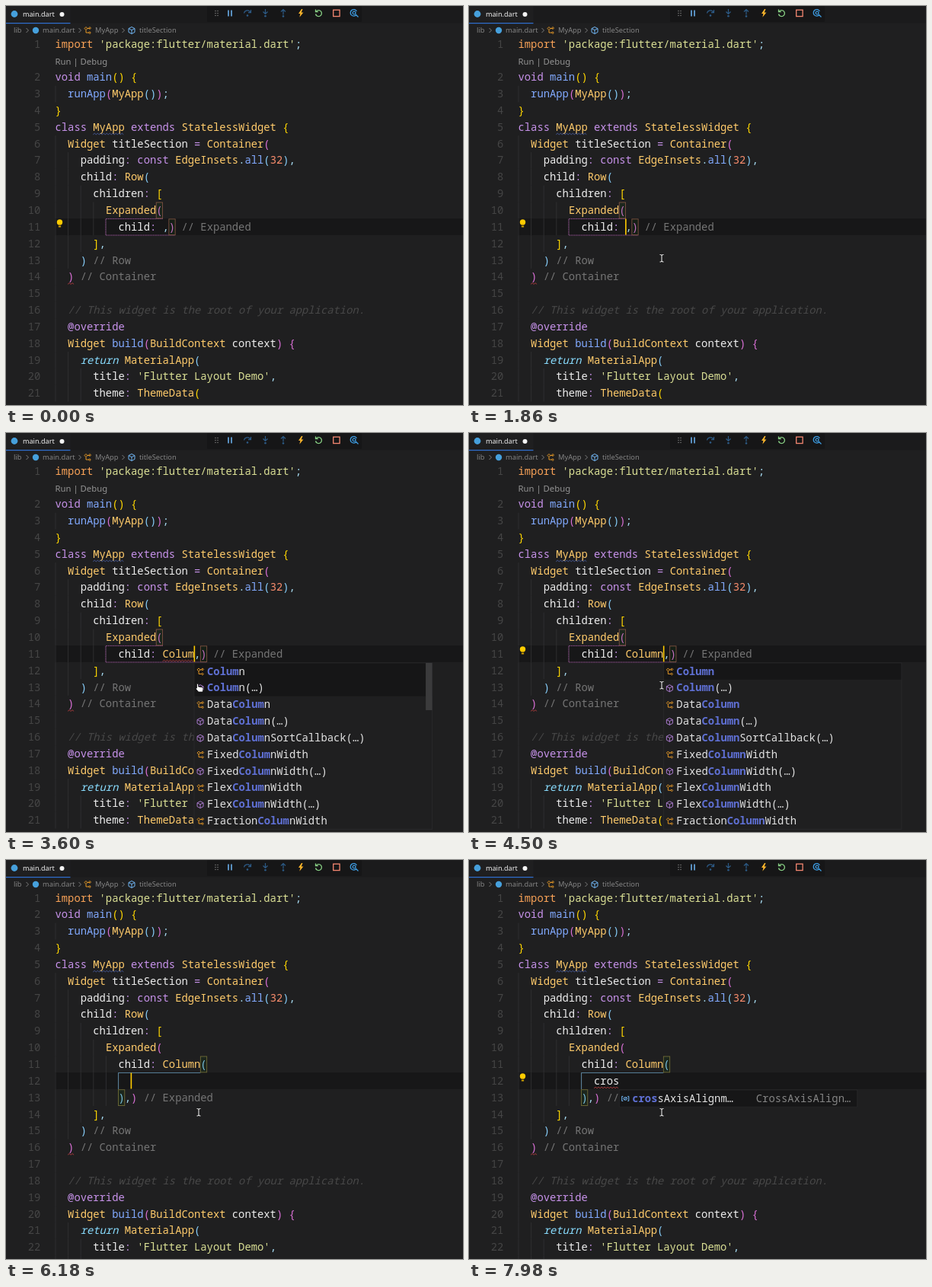
Animation, 600 px wide and 524 px high, one loop 8000 ms. Source, as an HTML page:

```html
<!DOCTYPE html>
<html lang="en">
<head>
<meta charset="utf-8">
<title>Editor autocomplete</title>
<style>
  html, body { margin: 0; width: 100%; height: 100%; overflow: hidden; background: #1f1f20; }
  svg { display: block; }
  text { white-space: pre; }
  .code { font: 13.83px "Noto Sans Mono", "DejaVu Sans Mono", monospace; font-variant-ligatures: none; }
  .ui { font-family: "Noto Sans", "Open Sans", sans-serif; }
</style>
</head>
<body>
<svg id="stage" width="600" height="524" viewBox="0 0 600 524">
  <rect width="600" height="524" fill="#1f1f20"/>
  <g id="editor" class="code"></g>
  <g id="chrome" class="ui"></g>
  <g id="popup" class="code"></g>
  <rect id="caret" width="1.6" height="21" y="279.5" fill="#ffcc00"/>
  <g id="mouse"></g>
</svg>
<script>
const LOOP = 8000, X0 = 64.5, CW = 8.298, Y0 = 50, LH = 21.84;
const LAG = 140, NEWLINE = 6120, POP_TOP = 302;
const EDIT_ROW = 11;
const BRACKETS = ['#ffd700', '#da70d6', '#87cefa'];
const C = {
  white: '#eeeeee', type: '#ffcb6b', key: '#c792ea', fn: '#82aaff', str: '#dbe095',
  num: '#f78c6c', punct: '#a5daf0', label: '#757575', note: '#484848', dim: '#858585',
  match: '#5f70d4', field: '#75beff', cube: '#b180d7', cls: '#ee9d28', mark: '#46a0dc',
  error: '#d04545', info: '#4f68b8'
};

// Time of each key press and the text it leaves after "child: "
const keys = [
  [-500, ''], [2820, 'C'], [3000, 'Co'], [3140, 'Col'], [3340, 'Colu'], [3450, 'Colum'],
  [4050, 'Column'], [4630, 'Column()'], [NEWLINE, '\n'],
  [7140, '\nc'], [7260, '\ncr'], [7380, '\ncro'], [7475, '\ncros']
];

const columns = ['Column', 'Column(…)', 'DataColumn', 'DataColumn(…)', 'DataColumnSortCallback(…)',
  'FixedColumnWidth', 'FixedColumnWidth(…)', 'FlexColumnWidth', 'FlexColumnWidth(…)', 'FractionColumnWidth'];
const params = ['children: <Widget>…', 'crossAxisAlignment:', 'key:', 'mainAxisAlignment:',
  'mainAxisSize:', 'textBaseline:', 'textDirection:', 'verticalDirection:'];

const $ = id => document.getElementById(id);
const colX = c => X0 + c * CW;
const rowY = r => Y0 + r * LH;
const isBroken = word => word[0] === '\n';
const esc = s => s.replace(/&/g, '&amp;').replace(/</g, '&lt;');
const text = (x, y, s, fill, extra = '') => `<text x="${x.toFixed(2)}" y="${y.toFixed(2)}" fill="${fill}" ${extra}>${esc(s)}</text>`;
const rect = (x, y, w, h, fill, extra = '') => `<rect x="${x}" y="${y}" width="${w}" height="${h}" fill="${fill}" ${extra}/>`;
const path = (d, stroke, w = 1, extra = '') => `<path d="${d}" fill="none" stroke="${stroke}" stroke-width="${w}" ${extra}/>`;
const at = (x, y, s) => `<g transform="translate(${x} ${y})">${s}</g>`;
const dot = (x, y, r, fill) => `<circle cx="${x}" cy="${y}" r="${r}" fill="${fill}"/>`;

const cube = color => path('M0 -4.5L4 -2.4V2.4L0 4.5L-4 2.4V-2.4ZM-4 -2.4L0 -.4L4 -2.4M0 -.4V4.5', color, 0.95);
const icons = {
  cls: path('M-4 -2.5l2 -2 2 2 -2 2zM-.5 -2.5H2.5M-2 -.5V3H2M2 -3.5l1 -1 1.5 1.5 -1.5 1.5zM1.5 3l1.3 -1.3 1.5 1.5 -1.4 1.3z', C.cls, 0.95),
  cube: cube(C.cube),
  field: path('M-3 -3H-4.5V3H-3M3 -3H4.5V3H3M-2.3 0a2.3 1.8 0 1 0 4.6 0a2.3 1.8 0 1 0 -4.6 0M-1.5 1.6L1.8 -1.8', C.field, 1)
};

function source(word) {
  const edit = isBroken(word)
    ? ['          child: Column(', ' '.repeat(12) + word.slice(1), '          ),) // Expanded']
    : [`          child: ${word},) // Expanded`];
  return [
    "import 'package:flutter/material.dart';",
    ...(isBroken(word) ? [] : [null]), // null is the "Run | Debug" row
    'void main() {', '  runApp(MyApp());', '}',
    'class MyApp extends StatelessWidget {',
    '  Widget titleSection = Container(',
    '    padding: const EdgeInsets.all(32),',
    '    child: Row(', '      children: [', '        Expanded(',
    ...edit,
    '      ],', '    ) // Row', '  ) // Container', '',
    '  // This widget is the root of your application.',
    '  @override', '  Widget build(BuildContext context) {',
    '    return MaterialApp(', "      title: 'Flutter Layout Demo',", '      theme: ThemeData('
  ];
}

function tokenColor(tok) {
  if (tok === 'import') return '#f9a257';
  if (tok === 'return') return '#89ddff';
  if (/^(void|class|extends|const|@override|[:=])$/.test(tok)) return C.key;
  if (/^(main|runApp|build|all)$/.test(tok)) return C.fn;
  if (/^[A-Z]/.test(tok)) return C.type;
  if (tok[0] === "'") return C.str;
  if (/^\d/.test(tok)) return C.num;
  return /^\w/.test(tok) ? C.white : C.punct;
}

function codeLine(line, y, state) {
  let out = '';
  for (const m of line.matchAll(/\/\/.*|'[^']*'|@?\w+|[^\s\w]/g)) {
    const tok = m[0];
    const note = tok.startsWith('//') && !line.slice(0, m.index).trim();
    let fill;
    if (tok.startsWith('//')) fill = note ? C.note : C.label;
    else if ('([{'.includes(tok)) fill = BRACKETS[state.depth++ % 3];
    else if (')]}'.includes(tok)) fill = BRACKETS[--state.depth % 3];
    else fill = tokenColor(tok);
    out += text(colX(m.index), y, tok, fill, note || tok === 'return' ? 'font-style="italic"' : '');
  }
  return out;
}

function squiggle(col, row, n, stroke) {
  let d = `M${colX(col)} ${rowY(row) + 9.6}`;
  for (let i = 0; i < n * CW / 2 - 1; i++) d += `l2 ${i % 2 ? 1.6 : -1.6}`;
  return path(d, stroke, 0.75);
}

const bracketBox = (col, row, stroke) =>
  rect(colX(col), rowY(row) - 10.4, CW, 20.8, 'rgba(0,100,0,.1)', `stroke="${stroke}" stroke-width=".9"`);

function pairGuide(word) {
  const top = 279.5, bottom = 301, olive = '#6f6a35', brown = '#7d5240';
  if (word === 'Column()') return bracketBox(23, 11, olive) + bracketBox(24, 11, olive);
  if (isBroken(word))
    return path(`M${colX(23)} ${top}H${colX(10)}V${bottom}`, BRACKETS[2], 0.8, 'opacity=".7"') +
      bracketBox(23, 10, olive) + bracketBox(10, 12, olive);
  const close = 18 + word.length;
  return path(`M${colX(17)} ${top}H${colX(8)}V${bottom}H${colX(close + 1)}`, BRACKETS[1], 0.9, 'stroke-dasharray="1.2 1" opacity=".85"') +
    bracketBox(16, 10, brown) + bracketBox(close, 11, brown);
}

function drawEditor(word, bulb) {
  const state = { depth: 0 };
  const shift = isBroken(word) ? 1 : 0;
  let out = rect(64, 279, 536, 22, '#171718'), num = 0;
  source(word).forEach((line, row) => {
    const y = rowY(row) + 4.6;
    if (line === null) {
      out += text(64.5, y + 1, 'Run | Debug', '#939393', 'class="ui" style="font-size:11.3px"');
      return;
    }
    out += text(45.3, y, String(++num), '#454545', 'text-anchor="end"');
    const indent = line ? line.search(/\S|$/) : 2;
    for (let c = 0; c < indent; c += 2)
      out += path(`M${colX(c) + 0.5} ${rowY(row) - LH / 2}v${LH}`, '#2f2f30');
    out += codeLine(line, y, state);
  });
  out += squiggle(6, 5 - shift, 5, C.info) + squiggle(2, 14 + shift, 1, C.error);
  if (/^Co?l?u?m?$/.test(word)) out += squiggle(17, EDIT_ROW, word.length, C.error);
  if (shift && word.length > 1) out += squiggle(12, EDIT_ROW, word.length - 1, C.error);
  out += pairGuide(word);
  if (bulb) out += dot(70.5, 284, 3.7, '#ffcc00') + rect(68.9, 286.5, 3.2, 4, '#d9a900') + rect(68.5, 287.8, 4, 0.9, '#171718');
  $('editor').innerHTML = out;
}

function item(s, x, y, query) {
  const i = query ? s.indexOf(query) : -1;
  if (i < 0) return text(x, y, s, '#e2e2e2');
  const end = i + query.length;
  return text(x, y, s.slice(0, i), '#e2e2e2') +
    text(x + i * CW, y, query, C.match, 'font-weight="700"') +
    text(x + end * CW, y, s.slice(end), '#e2e2e2');
}

function list(left, items, query, icon, detail, hover) {
  const w = 312.5, h = items.length * LH;
  let out = rect(left, POP_TOP, w, h, '#1f1f20', 'stroke="#29292b" stroke-width="1"');
  out += rect(left + 0.5, POP_TOP + 0.5, w - 1, (hover ? 2 : 1) * LH - 0.5, '#161617');
  items.forEach((s, i) => {
    const y = POP_TOP + (i + 0.5) * LH;
    out += at(left + 8, y + 0.5, icons[icon(s)]) + item(s, left + 17, y + 4.6, query);
  });
  if (detail) out += text(left + w - 8.5, POP_TOP + LH / 2 + 4.6, detail, '#858585', 'text-anchor="end"');
  if (hover) out += rect(left + w - 8.5, POP_TOP, 8.5, 62, '#3b3b3c');
  return out;
}

function drawPopup(kind, query) {
  let out = '';
  if (kind === 'column')
    out = list(colX(17 + query.length), columns, query, s => s.endsWith(')') ? 'cube' : 'cls', '', query.length < 6);
  if (kind === 'param')
    out = list(colX(24), params, '', () => 'field', 'List<Widget>');
  if (kind === 'cross')
    out = list(colX(12 + query.length), ['crossAxisAlignm…'], query, () => 'field', 'CrossAxisAlign…');
  $('popup').innerHTML = out;
}

function drawMouse(kind) {
  const ibeam = 'M-2.5 -4.5Q0 -4.5 0 -3Q0 -4.5 2.5 -4.5M0 -3V3.5M-2.5 5Q0 5 0 3.5Q0 5 2.5 5';
  const hand = '<path d="M-3.5 -5.5q1.5 -.8 2 .6v3l5.5 1q1.3 .4 1 2l-.8 4h-5.5l-3.4 -4q-.4 -1.4 1.2 -1z" fill="#fff" stroke="#111" stroke-width=".8"/>';
  $('mouse').innerHTML = kind === 'beam' ? at(253, 331, path(ibeam, '#111', 2.4) + path(ibeam, '#f0f0f0', 1.1))
    : kind === 'hand' ? at(254, 335, hand) : '';
}

function drawChrome() {
  const size = n => `style="font-size:${n}px"`;
  let out = rect(0, 0, 600, 22.5, '#1b1b1c') + rect(0, 0, 84.5, 22.5, '#1f1f20') + rect(0, 22, 84.5, 1.2, '#2f6fd0');
  out += dot(11, 10.5, 4.4, C.mark) + text(22, 14.2, 'main.dart', '#f0f0f0', size(9.1)) + dot(73.5, 11, 3, '#f4f4f4');
  const crumbs = [[10, 'lib'], [48, 'main.dart'], [117, 'MyApp'], [175, 'titleSection']];
  for (const [x, s] of crumbs) out += text(x, 35.2, s, C.dim, size(9.3));
  for (const x of [28, 97, 154]) out += path(`M${x - 1.5} 29l3 3 -3 3`, C.dim, 0.9);
  out += dot(39, 32, 4.2, C.mark) + at(107, 32, icons.cls) + at(165, 32, cube(C.field));

  out += rect(264, 0, 203, 21, '#161617', 'rx="1"');
  for (let i = 0; i < 6; i++) out += dot(275 + i % 2 * 3, 6.5 + (i >> 1) * 3, 0.8, '#777');
  const blue = '#6fb8f8', dim = '#2d5b87';
  out += path('M292 5.5v8M296 5.5v8', blue, 1.5);
  out += at(317, 9.5, path('M-4.5 0a4.5 4.5 0 0 1 8.5 -1M4.5 -4.5V-.8H1', dim, 1.2) + dot(0, 3, 1.3, dim));
  out += at(340.5, 9, path('M0 -5V1.5M-3 -1.5L0 1.5L3 -1.5', dim, 1.2) + dot(0, 4.3, 1.3, dim));
  out += at(364, 9, path('M0 2.5V-4.5M-3 -1.5L0 -4.5L3 -1.5', dim, 1.2) + dot(0, 4.5, 1.3, dim));
  out += '<path d="M388 4l-4 6h2.4l-1 4.8 5 -6.4h-2.7l1.8 -4.4z" fill="#ffb62c"/>';
  out += at(410.5, 9.5, path('M-3.2 -2.4A4 4 0 1 1 -4 1M-4 -5V-1.8H-.8', '#89d185', 1.3));
  out += rect(429.7, 5.2, 8.4, 8.4, 'none', 'stroke="#f48771" stroke-width="1.3"');
  out += at(457, 9, path('M3 2.4A4.3 4.3 0 1 1 3.4 -2M2 2L5.5 5.5M-1.8 0a1.9 1.9 0 1 0 3.8 0a1.9 1.9 0 1 0 -3.8 0', '#3d9be0', 1.3));
  $('chrome').innerHTML = out;
}

const keyAt = t => keys.reduce((a, k) => k[0] <= t ? k : a);

// Suggestions follow the typing with a short lag
function popupAt(t, word) {
  const seen = keyAt(t - LAG)[1];
  if (/^C\w*$/.test(word) && seen) return ['column', seen];
  if (word === 'Column()' && t >= 5150 && t < 5860) return ['param', ''];
  if (isBroken(seen) && seen.length > 2) return ['cross', seen.slice(1)];
  return ['', ''];
}

const last = {};
function update(name, draw, ...args) {
  const key = JSON.stringify(args);
  if (last[name] === key) return;
  last[name] = key;
  draw(...args);
}

function render(t) {
  const [pressed, word] = keyAt(t);
  const bulb = t < 2820 || (t >= 4300 && t < NEWLINE) || t >= 7700;
  const [kind, query] = popupAt(t, word);
  update('editor', drawEditor, word, bulb);
  update('popup', drawPopup, kind, query);
  const hover = kind === 'column' && query.length < 6;
  update('mouse', drawMouse, t < 420 ? '' : hover ? 'hand' : 'beam');
  const col = isBroken(word) ? 11 + word.length : 17 + word.replace(')', '').length;
  $('caret').setAttribute('x', colX(col) - 0.5);
  $('caret').setAttribute('visibility', Math.floor((t - pressed) / 500) % 2 ? 'hidden' : 'visible');
}

drawChrome();
const start = performance.now();
function tick() {
  render((performance.now() - start) % LOOP);
  requestAnimationFrame(tick);
}
tick();
</script>
</body>
</html>
```
